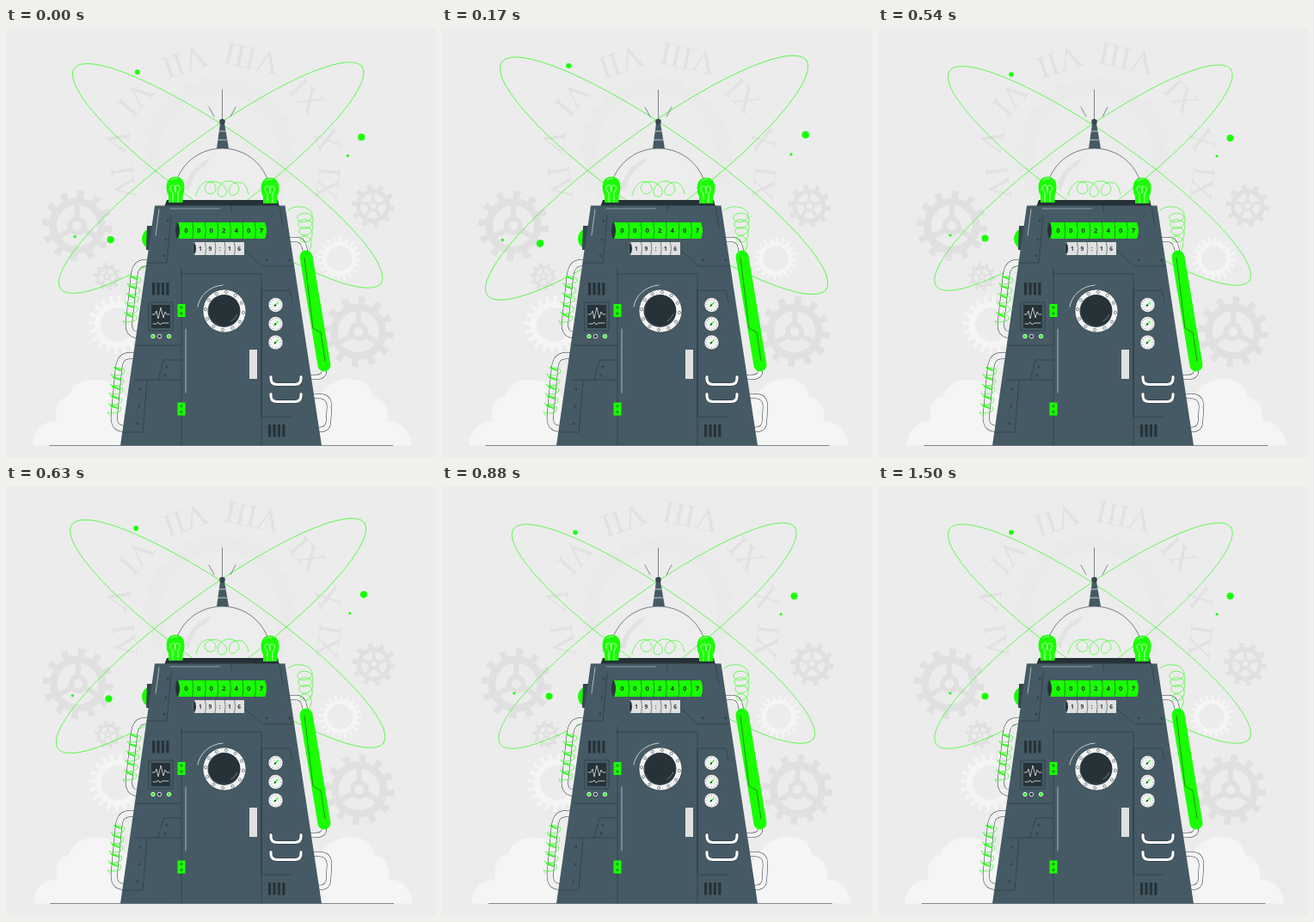
Recreate the animation shown at these times as an HTML page. Size 500 by 500 pixels, loop 1540 ms.

```html
<!DOCTYPE html>
<html lang="en">
<head>
<meta charset="utf-8">
<title>Time machine</title>
<style>
html, body { margin: 0; width: 100%; height: 100%; overflow: hidden; background: #ececec; }
svg { display: block; width: 100%; height: 100%; }
.line { fill: none; stroke: #263238; stroke-width: .55; stroke-linecap: round; stroke-linejoin: round; }
.wire { fill: none; stroke: #19ff00; stroke-width: .6; stroke-linecap: round; }
.shine { fill: none; stroke: #fff; stroke-width: .7; stroke-linecap: round; }
.dark { fill: #263238; }
.green { fill: #19ff00; }
.numeral { font: 38px "Liberation Serif", serif; fill: #e1e1e1; text-anchor: middle; }
.digit { font-family: "Open Sans", sans-serif; font-weight: 700; fill: #263238; text-anchor: middle; }
</style>
</head>
<body>
<svg viewBox="0 0 500 500">
  <g id="backdrop">
    <g id="clock"></g>
    <g id="gears"></g>
    <g fill="#f5f5f5">
      <path d="M31 485.500C32 468 43 457 59 457C55 442 62 430 73 428C77 414 91 408 105 409C121 409 132 417 140 430L190 485.500Z"/>
      <path d="M472 485.500C471 469 459 457 444 457C447 443 439 431 427 429C425 415 413 408 400 408C384 408 371 416 364 430L310 485.500Z"/>
    </g>
    <path class="line" d="M51 485.500H450"/>
  </g>

  <g id="orbits">
    <g class="wire">
      <ellipse rx="212.800" ry="45" transform="translate(257.500 172) rotate(35)"/>
      <ellipse rx="212.800" ry="45" transform="translate(239 174) rotate(-36.400)"/>
    </g>
    <g class="green" id="particles"></g>
  </g>

  <!-- side pipes -->
  <ellipse class="green" cx="167" cy="245" rx="9" ry="11"/>
  <path fill="#37474f" d="M164 230h8v28h-9z"/>
  <g id="pipes"></g>
  <path class="wire" d="M328 212c9-8 27-4 28 5s-16 12-17 4 19-8 18 3-17 12-17 4 18-7 17 4-16 11-16 4 17-6 15 5-14 10-14 4 15-4 13 7-10 9-9 12"/>
  <path d="M349 266L370 392" stroke="#19ff00" stroke-width="15" stroke-linecap="round"/>
  <path class="line" d="M347 267l10 82l9 5l5 33"/>

  <!-- dome and antenna -->
  <path fill="#fff" fill-opacity=".06" stroke="#263238" stroke-width=".6" d="M194 201C194 166 219 140 251.500 140S309 166 309 201"/>
  <path d="M207 188c4-18 15-31 31-37l-5 8c-11 6-17 15-20 30z" fill="#e2e2e2"/>
  <path class="wire" d="M221 195c4-18 17-20 22-12s-7 14-11 6 9-14 18-8 8 16 0 15-3-18 9-18 16 12 7 16-9-12 1-14 13 4 15 13"/>
  <path class="line" d="M251.500 72V106M236 92l6 11M267 92l-6 11"/>
  <path fill="#455a64" d="M249 111h5l5 29h-14z"/>
  <circle cx="251.500" cy="109" r="3.300" fill="#37474f"/>
  <path class="shine" d="M248 120h7M246.500 130h10"/>
  <path class="dark" d="M187 200H316l2 8H184z"/>
  <g id="bulbs"></g>

  <!-- body -->
  <path fill="#455a64" d="M173 206.500H324.500L367 485.500H133z"/>
  <path class="shine" d="M178 211l-4 30" opacity=".8"/>
  <path class="shine" d="M191 210h58" opacity=".6"/>
  <g class="line">
    <path d="M192 218l-5 55h-23M262 207v7M318 207l4 25M278 259l20 18h36"/>
    <path d="M152 369h52M204 386h-21l-6 23M150 409h54M164 410l-5 60h-22"/>
    <path d="M204 485V286h93v199M298 305h32l3 14M298 452h34M297 305v145M204 286v-6"/>
    <path d="M166 319h28v33h-28z"/>
  </g>
  <path class="shine" d="M209 350v74" opacity=".8"/>
  <g id="bolts" fill="none" stroke="#263238" stroke-width=".7"></g>
  <g id="vents" class="dark"></g>

  <!-- counters -->
  <path class="green" d="M200 226H301q4 9.500 0 19H200q-4-9.500 0-19z"/>
  <path class="dark" d="M199.500 226q4 9.500 0 19q-4-9.500 0-19z" stroke="#263238"/>
  <path fill="#e0e0e0" d="M219 249H277v15H219q-3-7.500 0-15z"/>
  <path class="dark" d="M219 249q4 7.500 0 15q-3-7.500 0-15z"/>
  <g id="counters"></g>

  <!-- monitor -->
  <path class="dark" d="M169 322h22v27h-22z"/>
  <path class="shine" d="M170 333h3l2-4 2 9 3-13 3 12 2-7 2 3h3M171 344h4l2-2 2 3 3-2h7"/>
  <g stroke="#fff" stroke-width=".9">
    <circle class="green" cx="171" cy="358.500" r="2.200"/>
    <circle class="dark" cx="178.500" cy="358.500" r="2.200"/>
    <circle class="green" cx="189.500" cy="358.500" r="2.200"/>
  </g>
  <path class="green" d="M199.500 321h9v15h-9zM199.500 435.500h9v15h-9z"/>
  <g fill="none" stroke="#263238" stroke-width=".7" id="hinges"></g>

  <!-- porthole -->
  <circle cx="254" cy="329" r="25" fill="#f5f5f5" stroke="#263238" stroke-width=".6"/>
  <g id="studs" fill="none" stroke="#37474f" stroke-width=".6"></g>
  <path class="shine" d="M223 324c2-13 14-24 29-25"/>
  <circle cx="253.500" cy="329" r="19" fill="#37474f"/>
  <circle class="dark" cx="254" cy="328.500" r="18"/>
  <path class="shine" d="M262 341q5-3 7-8" opacity=".5"/>
  <path fill="#e0e0e0" d="M283 374h9v34h-9z"/>
  <g id="gauges"></g>
  <g id="handles"></g>
</svg>
<script>
const $ = id => document.getElementById(id);
const add = (id, markup) => $(id).insertAdjacentHTML('beforeend', markup);
const circle = (x, y, r, attrs = '') => `<circle cx="${x}" cy="${y}" r="${r}" ${attrs}/>`;
const polar = (x, y, r, deg) => {
  const a = deg * Math.PI / 180;
  return [x + r * Math.cos(a), y + r * Math.sin(a)];
};

// Clock
add('clock', circle(248, 145, 76, 'fill="none" stroke="#eaeaea" stroke-width="15"') +
  circle(248, 145, 86, 'fill="none" stroke="#eaeaea" stroke-width="7" pathLength="48" stroke-dasharray="1"'));
[['IV', 137, 180, -98], ['V', 129, 131, -76], ['VI', 151, 82, -49], ['VII', 208, 39, -19],
 ['VIII', 286, 35, 12], ['XI', 350, 79, 47], ['X', 374, 130, 72], ['XI', 375, 181, 97]]
  .forEach(([text, x, y, turn]) =>
    add('clock', `<text class="numeral" transform="translate(${x} ${y}) rotate(${turn + 180})" y="12">${text}</text>`));

// Gears
function gear(x, y, r, teeth, color, spokes) {
  const ring = (k, w, extra = '') =>
    circle(x, y, r * k, `fill="none" stroke="${color}" stroke-width="${r * w}" ${extra}`);
  let out = ring(.69, .21) + ring(.88, .24, `pathLength="${teeth * 2}" stroke-dasharray=".8 1.2"`);
  if (spokes) out += ring(.2, .14);
  for (let i = 0; i < spokes; i++) {
    const a = i * 360 / spokes - 90;
    const [x1, y1] = polar(x, y, r * .22, a), [x2, y2] = polar(x, y, r * .62, a);
    out += `<path d="M${x1} ${y1}L${x2} ${y2}" stroke="${color}" stroke-width="${r * .15}"/>`;
  }
  add('gears', out);
}
gear(83, 230, 41, 12, '#e0e0e0', 3);
gear(118, 289, 16, 10, '#e0e0e0', 5);
gear(130, 345, 34, 20, '#f5f5f5', 0);
gear(427, 207, 25, 10, '#e0e0e0', 5);
gear(388, 268, 25, 20, '#f5f5f5', 0);
gear(410, 353, 41, 12, '#e0e0e0', 3);

[[155, 54, 2.8], [409.5, 128, 4], [394, 149, 1.5], [124.5, 244.5, 4], [84, 241, 1.6]]
  .forEach(p => add('particles', circle(...p)));

// Tubes with a thin dark outline
function tube(id, d, width, color) {
  add(id, `<path class="line" d="${d}" style="stroke-width:${width}"/>
    <path class="line" d="${d}" style="stroke:${color};stroke-width:${width - 1}"/>`);
}
tube('pipes', 'M167 273h-5c-8 0-12 6-13 15l-6 54c-1 10 3 15 12 15', 8, '#f0f0f0');
tube('pipes', 'M152 381h-8c-9 0-12 6-13 15l-5 53c-1 12 2 17 13 17', 8, '#f0f0f0');
tube('pipes', 'M329 246h9q7 0 9 9l2 10', 6, '#f5f5f5');
tube('pipes', 'M370 390v7q1 9-10 9h-8', 6, '#f5f5f5');
tube('pipes', 'M356 428h8q12 0 12 12l-1 17q0 10-11 10', 6, '#f5f5f5');

// Thin loops along a pipe, crossed by short thick bands
function coil(x, y, slant, turns) {
  let d = `M${x} ${y}`;
  for (let i = 0; i < turns; i++) d += `q12-1 12 4t-${12 + slant} 5q-6-4 0 ${i % 2 ? 1 : 3}`;
  add('pipes', `<path class="wire" d="${d}"/>`);
  for (let i = 0; i < turns; i++)
    add('pipes', `<path class="wire" style="stroke-width:1.700" d="M${x - i * slant} ${y + i * 11}l7 3"/>`);
}
coil(145, 289, 1.2, 5);
coil(126, 395, 1, 5);

// Bulbs
for (const x of [197, 307])
  add('bulbs', `<g transform="translate(${x} ${x < 250 ? 0 : 1})">
    <path class="green" d="M-8 203v-8q-2.500-4-2.500-10Q-10 173 0 173T10.500 185q0 6-2 10v8z"/>
    <path class="shine" d="M-3 202v-10q-6-7-1-9t4 8q-2-9 3-8t0 9v10M-5 177q3-3 7-2"/></g>`);

// Bolts and vents
[[188, 224], [186, 246], [184, 265], [303, 270], [330, 270], [187, 394], [185, 404],
 [156, 420], [155, 440], [153, 460]].forEach(([x, y]) => add('bolts', circle(x, y, 1.1)));
for (const [x, y] of [[170, 296], [305, 461]])
  for (let i = 0; i < 4; i++)
    add('vents', `<rect x="${x + i * 5.4}" y="${y}" width="3.200" height="14.500" rx=".6"/>`);
for (const y of [325, 332, 439.5, 446.5]) add('hinges', circle(204, y, 1.2));
for (let i = 0; i < 12; i++) add('studs', circle(...polar(254, 329, 22, i * 30 + 5), 1.6));

// Counters
function counter(text, x, y, step, size, half) {
  [...text].forEach((ch, i) => {
    const cx = x + i * step;
    add('counters', `<text class="digit" x="${cx}" y="${y}" font-size="${size}">${ch}</text>`);
    if (i < text.length - 1)
      add('counters', `<path class="line" d="M${cx + step / 2} ${y - size * .36 - half}q2 ${half} 0 ${half * 2}"/>`);
  });
}
counter('0002407', 209.5, 238.2, 14.55, 7.6, 9.5);
counter('19:16', 226, 259, 11.3, 6.6, 7.5);

// Gauges
for (const y of [322, 344, 365.5]) {
  add('gauges', circle(313.5, y, 8.5, 'fill="#f5f5f5" stroke="#263238" stroke-width=".5"') +
    circle(313.5, y, 6.4, 'fill="none" stroke="#455a64" stroke-width="1.200" pathLength="24" stroke-dasharray=".3 1.700"') +
    `<path d="M311.500 ${y + 2}l5-5" stroke="#19ff00" stroke-width="1.100"/>` +
    circle(313, y + .5, 1.1, 'class="dark"'));
}
for (const y of [405.5, 425.5])
  tube('handles', `M308 ${y}v2q0 7 7 7h21q7 0 7-7v-2`, 4.2, '#fff');

// Motion: [progress, value] pairs joined by straight segments
const shake = [[0, 0], [.1, -1], [.2, 2], [.3, -4], [.4, 4], [.5, -4], [.6, 4], [.7, -4], [.8, 2], [.9, -1], [1, 0]];
const beat = [[0, 1], [.1, 1.1], [.3, 1], [.4, 1], [.5, 1.1], [.6, 1], [1, 1]];
function at(track, p) {
  const i = Math.max(1, track.findIndex(([stop]) => stop >= p));
  const [p0, v0] = track[i - 1], [p1, v1] = track[i];
  return v0 + (v1 - v0) * (p - p0) / (p1 - p0);
}

const LOOP = 1540, TICKS = 37, LEAD = .85;
function draw() {
  const tick = Math.floor(performance.now() % LOOP / LOOP * TICKS + .1);
  const p = Math.min((tick + LEAD) / 36, 1);
  $('backdrop').setAttribute('transform', `translate(${at(shake, p)} 0)`);
  $('orbits').setAttribute('transform', `translate(249.5 174) scale(${at(beat, p)}) translate(-249.5 -174)`);
  requestAnimationFrame(draw);
}
draw();
</script>
</body>
</html>
```
